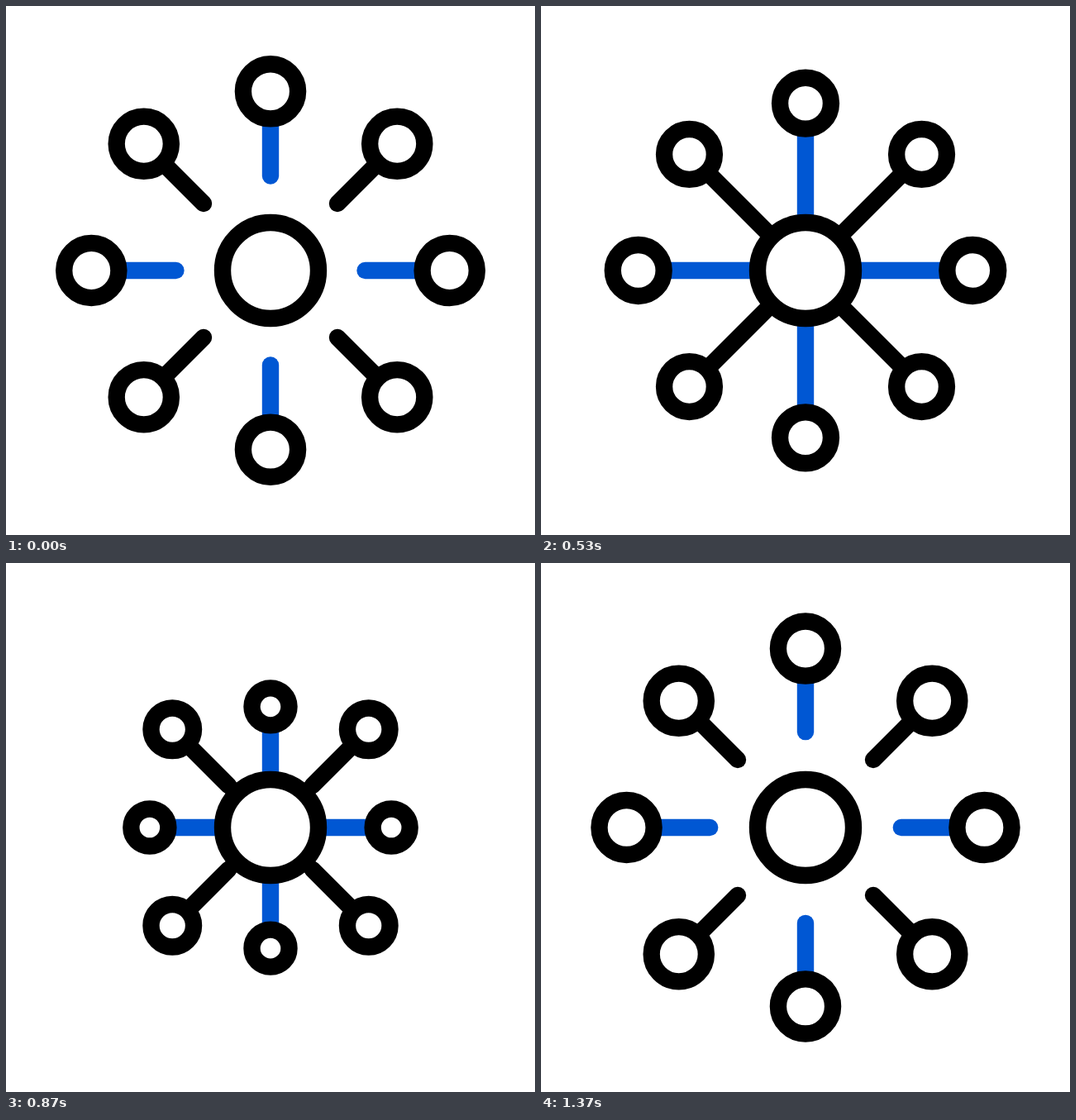
These frames come from a looping animation (640x640 px, 1670 ms). An HTML page:

```html
<!DOCTYPE html>
<html lang="en">
<head>
<meta charset="utf-8">
<title>Hub and nodes</title>
<style>
  html, body { margin: 0; width: 100%; height: 100%; overflow: hidden; background: #fff; }
  svg { display: block; width: 100%; height: 100%; }
  line, circle { stroke: #000; stroke-width: 20.4; stroke-linecap: round; fill: #fff; }
  .blue line { stroke: #0057d3; }
</style>
</head>
<body>
<svg id="stage" viewBox="-320 -320 640 640"></svg>
<script>
const LOOP = 1670, FPS = 30, LAST = 49;
const DIST = 216.7, RADIUS = 33.1, SHRINK = 0.15;
const TIP = 116, REACH = 52;

const stage = document.getElementById('stage');

function add(parent, tag, attrs = {}) {
  const el = document.createElementNS('http://www.w3.org/2000/svg', tag);
  for (const name in attrs) el.setAttribute(name, attrs[name]);
  return parent.appendChild(el);
}

const mix = (a, b, s) => 3 * a * s * (1 - s) ** 2 + 3 * b * s * s * (1 - s) + s ** 3;

// Cubic Bezier easing, solved by bisection
function bezier(x1, y1, x2, y2) {
  return u => {
    if (u <= 0) return 0;
    if (u >= 1) return 1;
    let lo = 0, hi = 1;
    for (let i = 0; i < 24; i++) {
      const mid = (lo + hi) / 2;
      if (mix(x1, x2, mid) < u) lo = mid; else hi = mid;
    }
    return mix(y1, y2, lo);
  };
}

const smooth = bezier(0.2, 0, 0.8, 1);
const settle = bezier(0.2, 0, 0.5, 1);
const spring = bezier(0, 0.05, 0.7, 1);
const span = (k, from, to) => (k - from) / (to - from);

const groups = [
  { travel: 73, pull: [13, 25], ease: smooth, push: [25.75, 41.5] },
  { travel: 56.7, pull: [13, 24], ease: settle, push: [25, 36.5] }
];

const arms = [];
for (let i = 0; i < 8; i++) {
  const g = add(stage, 'g', { transform: `rotate(${i * 45})`, class: i % 2 ? '' : 'blue' });
  arms.push({
    group: groups[i % 2],
    line: add(g, 'line', { y1: 0, y2: 0 }),
    node: add(g, 'circle')
  });
}
add(stage, 'circle', { r: 58 });

function draw(time) {
  const k = Math.min(LAST, Math.floor((time % LOOP + 3.4) * FPS / 1000));
  const grow = smooth(span(k, -1, 13));
  for (const { group, line, node } of arms) {
    const back = spring(span(k, ...group.push));
    const shift = group.travel * (group.ease(span(k, ...group.pull)) - back);
    const x = DIST - shift;
    node.setAttribute('cx', x);
    node.setAttribute('r', RADIUS - SHRINK * shift);
    line.setAttribute('x1', TIP - REACH * (grow - back));
    line.setAttribute('x2', x);
  }
}

function tick(now) {
  draw(now);
  requestAnimationFrame(tick);
}
draw(0);
requestAnimationFrame(tick);
</script>
</body>
</html>
```
